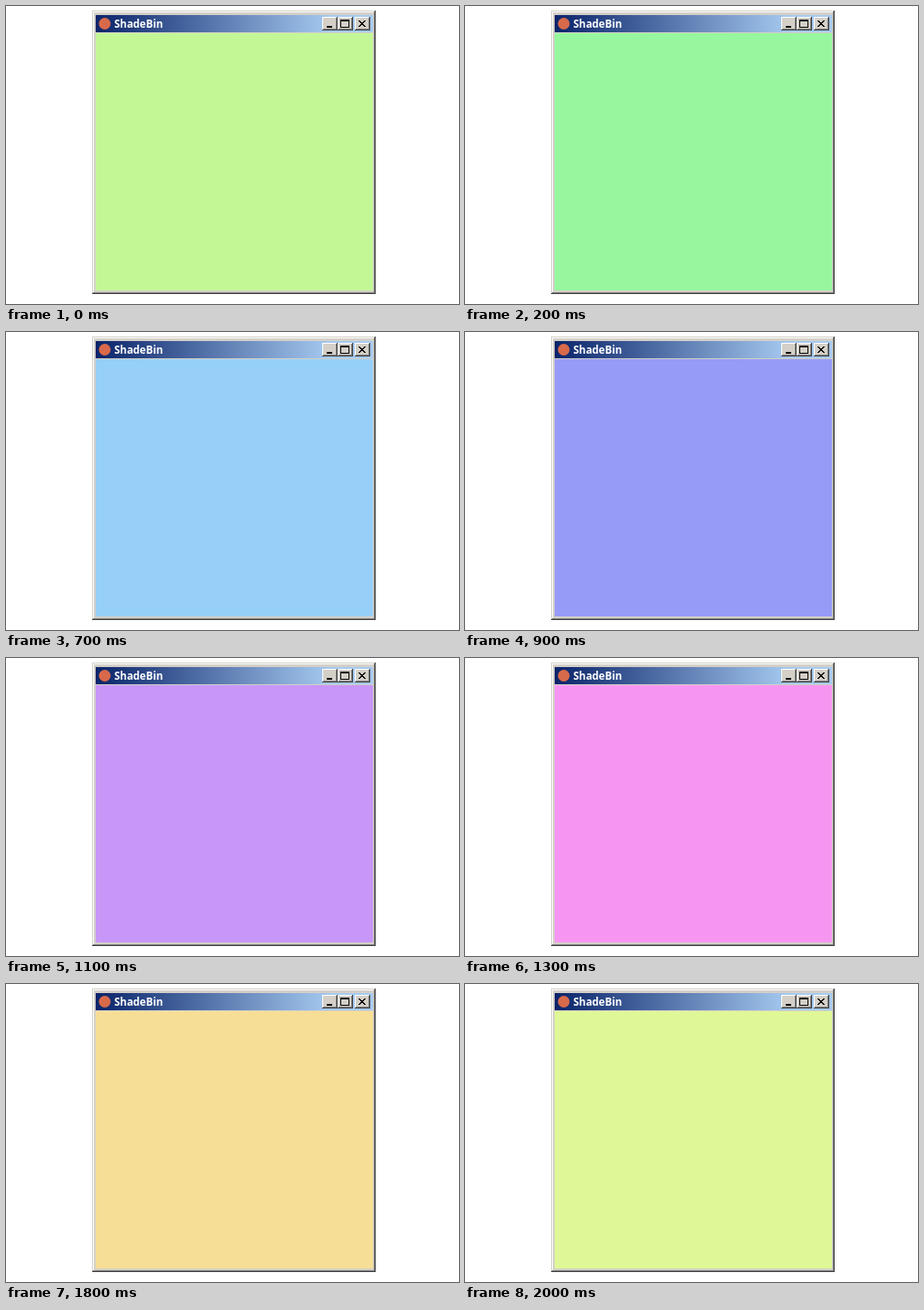
Animation of 500x329 px, one loop 2.1 s. Source, as an HTML page with a canvas:

```html
<!DOCTYPE html>
<html lang="en">
<head>
<meta charset="utf-8">
<title>ShadeBin</title>
<style>
html, body { margin: 0; width: 100%; height: 100%; overflow: hidden; background: #fff; }
canvas { display: block; }
</style>
</head>
<body>
<canvas id="stage" width="500" height="329"></canvas>
<script>
const ctx = document.getElementById('stage').getContext('2d');
const LOOP = 2100, STEP = 100;
// [step, hue in degrees]
const HUES = [[0, 92], [4, 158], [7, 205], [9, 237], [13, 303], [16, 374], [20, 435], [21, 452]];

function box(x, y, w, h, color) {
  ctx.fillStyle = color;
  ctx.fillRect(x, y, w, h);
}

// Nested bevel: top-left colour, bottom-right colour, then the face
function bevel(x, y, w, h, light, dark) {
  box(x, y, w, h, dark);
  box(x, y, w - 1, h - 1, light);
}

function button(x, w) {
  bevel(x, 12, w, 15, '#ffffff', '#404040');
  bevel(x + 1, 13, w - 2, 13, '#d4d0c8', '#808080');
}

function drawWindow() {
  box(0, 0, 500, 329, '#ffffff');
  bevel(95, 5, 313, 313, '#d4d0c8', '#404040');
  bevel(96, 6, 311, 311, '#ffffff', '#808080');
  box(97, 7, 309, 309, '#d4d0c8');

  const bar = ctx.createLinearGradient(99, 0, 405, 0);
  bar.addColorStop(0, '#0a246a');
  bar.addColorStop(0.85, '#a6caf0');
  bar.addColorStop(1, '#a6caf0');
  box(99, 10, 306, 19, bar);

  ctx.fillStyle = '#d8694a';
  ctx.beginPath();
  ctx.arc(109, 19.5, 6.5, 0, Math.PI * 2);
  ctx.fill();

  ctx.fillStyle = '#ffffff';
  ctx.font = '700 11.5px "Open Sans", "Noto Sans", sans-serif';
  ctx.fillText('ShadeBin', 119.5, 24);

  button(349, 17);
  box(354, 22, 6, 2, '#000000');

  button(366, 17);
  box(369, 15, 10, 9, '#000000');
  box(370, 17, 8, 6, '#d4d0c8');

  button(385, 17);
  for (let i = 0; i < 7; i++) {
    box(389 + i, 16 + i, 2, 1, '#000000');
    box(395 - i, 16 + i, 2, 1, '#000000');
  }
}

function hueAt(step) {
  const i = HUES.findIndex(k => k[0] > step);
  const [s0, h0] = HUES[i - 1], [s1, h1] = HUES[i];
  return h0 + (h1 - h0) * (step - s0) / (s1 - s0);
}

function panel(step) {
  const hue = hueAt(step);
  const channel = n => {
    const k = (n + hue / 60) % 6;
    return Math.round(247 - 97 * Math.max(0, Math.min(k, 4 - k, 1)));
  };
  box(99, 30, 306, 284, `rgb(${channel(5)},${channel(3)},${channel(1)})`);
}

const start = performance.now();
function frame() {
  const t = (performance.now() - start) % LOOP;
  panel(Math.floor(t / STEP));
  requestAnimationFrame(frame);
}

drawWindow();
frame();
</script>
</body>
</html>
```
